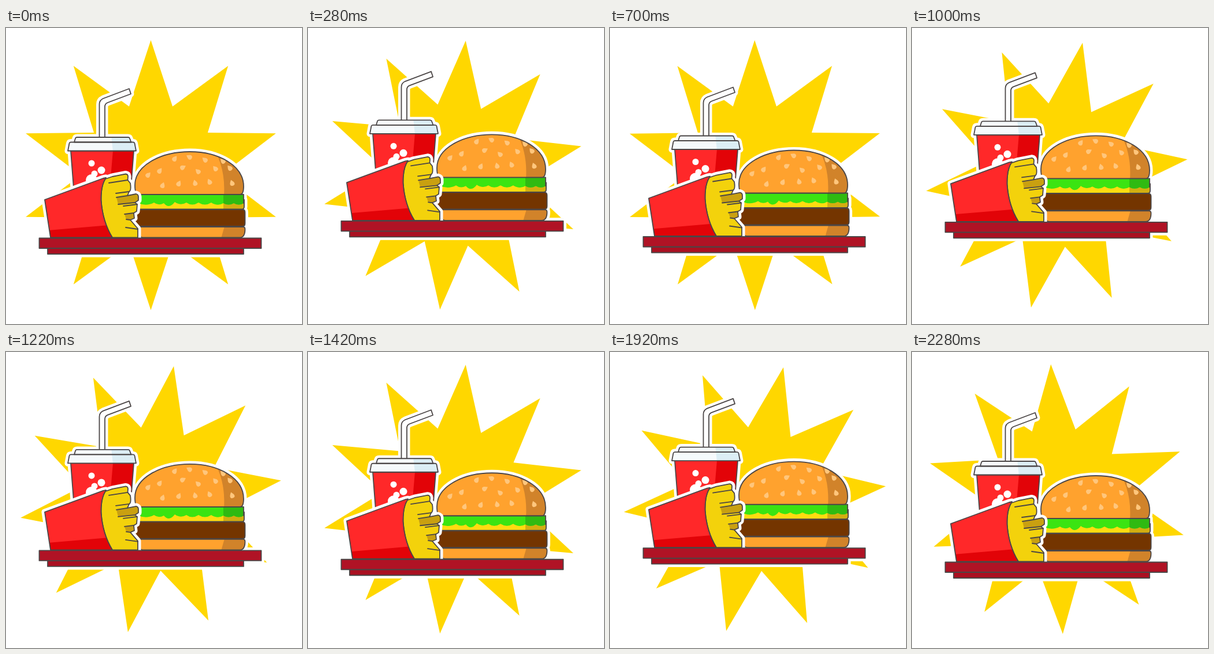
Recreate the animation shown at these times as an HTML page. Size 512 by 512 pixels, loop 2300 ms.

```html
<!DOCTYPE html>
<html lang="en">
<head>
<meta charset="utf-8">
<title>Burger menu</title>
<style>
  html, body { margin: 0; width: 100%; height: 100%; overflow: hidden; background: #fff; }
  svg { display: block; width: 100%; height: 100%; }
  .line { fill: none; stroke: #4b4646; stroke-width: 1.8; stroke-linejoin: round; stroke-linecap: round; }
  .halo { fill: #fff; stroke: #fff; stroke-width: 11; stroke-linejoin: round; }
</style>
</head>
<body>
<svg viewBox="0 0 512 512">
  <defs>
    <path id="straw" d="M161.500 190V132Q161.500 125 168 122L213 105L216 114L176 129Q171 131 171 136V190Z"/>
    <path id="rim" d="M118 197.500L120 191Q120.500 189 123 189H211Q213.500 189 214 191L216.500 197.500Z"/>
    <path id="lid" d="M107 212.500L109.500 199.500Q110 197.500 112 197.500H220Q222 197.500 222.500 199.500L225 212.500Z"/>
    <path id="cup" d="M112 212.500H221L215 290H118Z"/>
    <path id="box" d="M67 297L168 260L173 259Q164 272 164.500 298Q167 335 184 362.500H77Z"/>
    <path id="fries" d="M172 261L184 257L207 252.500Q211 253 211 257L210.500 263L215 268.500Q217 281 213 283L210 290L225 287Q229 288 229 292V298L223 302L227 305L226 317L221 320L222 329L215 332L228 347V362.500H184Q167 335 164.500 298Q164 272 172 261Z"/>
    <path id="bun" d="M223 272C223 238 267 214 318 214C368 214 411 238 411 274Q411 288 405 288H229Q223 288 223 272Z"/>
    <path id="lettuce" d="M229 288H411V303Q403 308 394 303Q385 308 376 303Q366 309 355 302Q344 309 333 302Q322 309 312 302Q302 308 292 301Q282 314 273 303Q264 308 256 302Q243 309 229 303Z"/>
    <path id="cheese" d="M229 297H412V309Q412 313.500 408 313.500H229Z"/>
    <path id="patty" d="M227 314H409Q413.500 314 413.500 319V338Q413.500 343 409 343H227Q222 343 222 338V319Q222 314 227 314Z"/>
    <path id="base" d="M229 344H410Q413.500 344 413.500 348Q413.500 362.500 404 362.500H238Q228 362.500 228 349Z"/>
    <path id="tray" d="M57.500 363.500H441.500V381H57.500Z"/>
    <path id="foot" d="M72 381H411V391H72Z"/>
    <path id="seed" d="M0 -6C2 -3 5 0 4 3C3 6 -3 6 -4 3C-5 0 -2 -3 0 -6Z"/>
    <clipPath id="inBun"><use href="#bun"/></clipPath>
    <clipPath id="inLid"><use href="#rim"/><use href="#lid"/></clipPath>
    <clipPath id="inCup"><use href="#cup"/></clipPath>
    <clipPath id="inBox"><use href="#box"/></clipPath>
    <clipPath id="inLettuce"><use href="#lettuce"/></clipPath>
    <clipPath id="inCheese"><use href="#cheese"/></clipPath>
    <clipPath id="inBase"><use href="#base"/></clipPath>
  </defs>

  <rect width="512" height="512" fill="#fff"/>
  <polygon id="star" fill="#ffd700"/>

  <g id="meal">
    <g class="halo"><use href="#tray"/><use href="#foot"/></g>

    <g class="halo"><use href="#straw"/><use href="#rim"/><use href="#lid"/><use href="#cup"/></g>
    <use href="#straw" fill="#fff"/><use href="#straw" class="line"/>
    <use href="#cup" fill="#ff2829"/>
    <path clip-path="url(#inCup)" fill="#e20308" d="M185 212H230V295H178Z"/>
    <g fill="#fff">
      <circle cx="148" cy="234" r="5.500"/>
      <circle cx="165" cy="246" r="6.500"/>
      <circle cx="153" cy="252" r="5.500"/>
      <circle cx="148" cy="263" r="10"/>
    </g>
    <use href="#cup" class="line"/>
    <g fill="#f6fafc"><use href="#rim"/><use href="#lid"/></g>
    <path clip-path="url(#inLid)" fill="#dceef5" d="M182 186H230V214H185Z"/>
    <use href="#rim" class="line"/><use href="#lid" class="line"/>

    <g class="halo"><use href="#bun"/><use href="#lettuce"/><use href="#cheese"/><use href="#patty"/><use href="#base"/></g>
    <use href="#base" fill="#ffa22e"/>
    <path clip-path="url(#inBase)" fill="#d1832a" d="M378 343H420V364H372Z"/>
    <use href="#base" class="line"/>
    <use href="#cheese" fill="#ffdc10"/>
    <path clip-path="url(#inCheese)" fill="#d3ae10" d="M376 290H420V320H376Z"/>
    <use href="#cheese" class="line"/>
    <use href="#lettuce" fill="#3be412"/>
    <path clip-path="url(#inLettuce)" fill="#2fba12" d="M376 286H420V312H376Z"/>
    <path class="line" d="M229 303V288H411V303"/>
    <use href="#patty" fill="#743500"/><use href="#patty" class="line"/>
    <use href="#bun" fill="#ffa22e"/>
    <path clip-path="url(#inBun)" fill="#d1832a" d="M360 210Q380 244 377 290H420V210Z"/>
    <g id="seeds" fill="#ffc67c"></g>
    <use href="#bun" class="line"/>

    <g class="halo"><use href="#box"/><use href="#fries"/></g>
    <use href="#fries" fill="#f3d20c"/>
    <g fill="#c9a010">
      <path d="M191 293L225 287Q229 288 229 292V298L223 302L194 305Z"/>
      <path d="M205 322L221 320L222 329L215 332L208 331Z"/>
    </g>
    <path class="line" d="M178 268L210.500 263M190 286L213 283M191 293L210 290M194 305L223 302M203 308L227 305M205 322L221 320M208 331L215 332M207 345L228 348"/>
    <use href="#fries" class="line"/>
    <use href="#box" fill="#ff2829"/>
    <path clip-path="url(#inBox)" fill="#e20308" d="M67 350.500L185 340.500V364H67Z"/>
    <use href="#box" class="line"/>

    <use href="#foot" fill="#aa1021"/><use href="#foot" class="line"/>
    <use href="#tray" fill="#b01325"/><use href="#tray" class="line"/>
  </g>
</svg>
<script>
  const LOOP = 2300, STEP = 20, BOB = 38, RISE = 14.5, HEIGHT = 29.8;
  const star = document.getElementById('star');
  const meal = document.getElementById('meal');

  const seeds = [
    [292, 226, 35], [317, 223, -60], [344, 228, -50], [375, 230, -45],
    [266, 247, 35], [306, 241, 60], [332, 248, -45], [362, 243, -40], [387, 242, -40],
    [246, 254, 40], [271, 272, 20], [299, 269, 25], [327, 268, -15], [352, 266, -25], [391, 268, -20]
  ];
  document.getElementById('seeds').innerHTML = seeds
    .map(([x, y, r]) => `<use href="#seed" transform="translate(${x} ${y}) rotate(${r}) scale(.95)"/>`)
    .join('');

  const ease = u => (1 - Math.cos(Math.PI * u)) / 2;

  // Quick rise, then a slower and flatter fall.
  function lift(n) {
    if (n < RISE) return HEIGHT * ease(n / RISE);
    const u = (n - RISE) / (BOB - RISE);
    return HEIGHT * (1 - (ease(u) + u) / 2);
  }

  function starPoints(turn) {
    const pts = [];
    for (let k = 0; k < 20; k++) {
      const a = (turn + k * 18) * Math.PI / 180;
      const size = k % 2 ? 0.535 : 1;
      const x = 250.5 + 227.5 * size * Math.sin(a);
      const y = 254.5 - 233.5 * size * Math.cos(a);
      pts.push(x.toFixed(2) + ',' + y.toFixed(2));
    }
    return pts.join(' ');
  }

  function draw(ms) {
    const n = Math.floor((ms % LOOP) / STEP);
    const turn = Math.max(0, n * 360 / 114 - 2.6);
    star.setAttribute('points', starPoints(turn));
    meal.setAttribute('transform', `translate(0 ${-lift(n % BOB).toFixed(2)})`);
  }

  const start = performance.now();
  function tick() {
    draw(performance.now() - start);
    requestAnimationFrame(tick);
  }
  tick();
</script>
</body>
</html>
```
